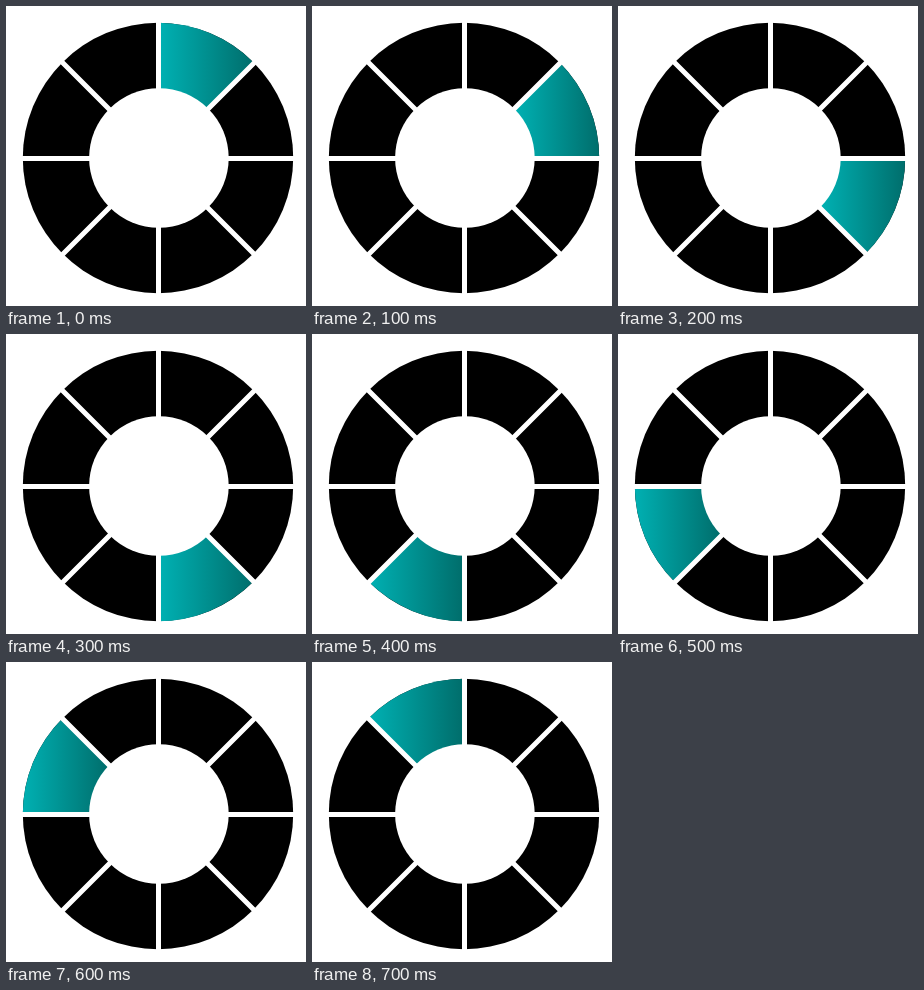
Recreate the animation shown at these times as an HTML page with a canvas. Size 300 by 300 pixels, loop 800 ms.

```html
<!DOCTYPE html>
<html>
<head>
<meta charset="utf-8">
<title>Ring spinner</title>
<style>
html, body { margin: 0; width: 100%; height: 100%; overflow: hidden; background: #fff; }
canvas { display: block; }
</style>
</head>
<body>
<canvas id="stage" width="300" height="300"></canvas>
<script>
const ctx = document.getElementById('stage').getContext('2d');
const MID = 152.5, RIM = 152, OUTER = 135.2, INNER = 69.8, GAP = 5;
const COUNT = 8, STEP = 100, TURN = Math.PI * 2;

// Horizontal extent of each segment, clockwise from the top
const spans = [[155, 247], [204, 287], [204, 287], [155, 247],
               [58, 150], [17, 102], [17, 102], [58, 150]];

function teal([left, right]) {
  const g = ctx.createLinearGradient(left, 0, right, 0);
  g.addColorStop(0, '#00b0b2');
  g.addColorStop(1, '#006e6c');
  return g;
}

function disc(x, y, r, fill) {
  ctx.beginPath();
  ctx.arc(x, y, r, 0, TURN);
  ctx.fillStyle = fill;
  ctx.fill();
}

function segment(i) {
  const start = i / COUNT * TURN - TURN / 4;
  ctx.beginPath();
  ctx.arc(RIM, RIM, OUTER, start, start + TURN / COUNT);
  ctx.lineTo(MID, MID);
  ctx.fillStyle = teal(spans[i]);
  ctx.fill();
}

function draw(time) {
  ctx.fillStyle = '#fff';
  ctx.fillRect(0, 0, 300, 300);
  disc(RIM, RIM, OUTER, '#000');
  segment(Math.floor(time / STEP) % COUNT);

  // White gaps and hole
  ctx.strokeStyle = '#fff';
  ctx.lineWidth = GAP;
  ctx.beginPath();
  for (let i = 0; i < COUNT; i++) {
    const a = i / COUNT * TURN;
    ctx.moveTo(MID, MID);
    ctx.lineTo(MID + 145 * Math.cos(a), MID + 145 * Math.sin(a));
  }
  ctx.stroke();
  disc(MID + 0.4, RIM, INNER, '#fff');
}

const begin = performance.now();
function tick() {
  draw(performance.now() - begin);
  requestAnimationFrame(tick);
}
tick();
</script>
</body>
</html>
```
